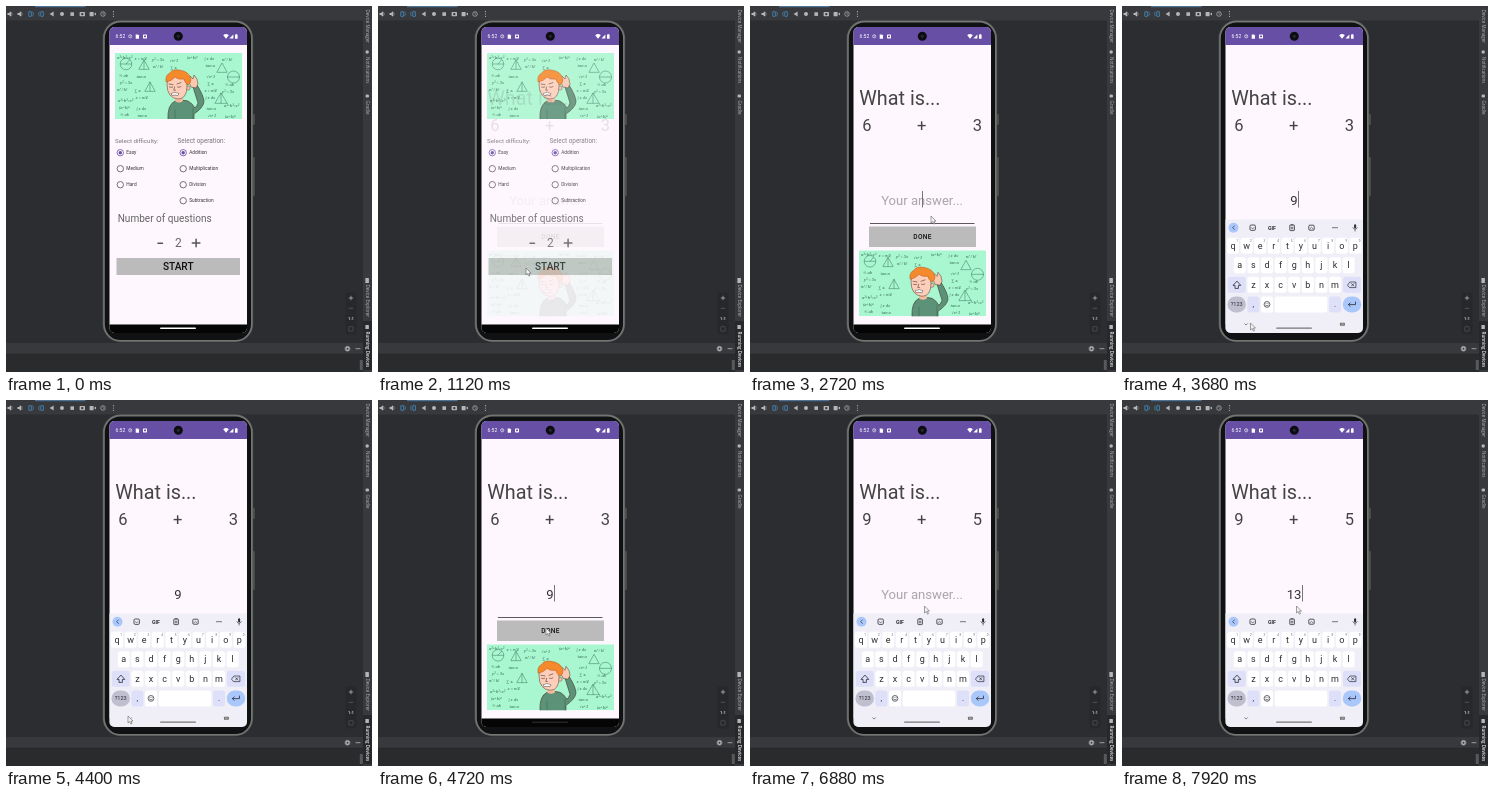
An HTML page that plays this animation: 366x366 px, repeating every 8000 ms.

```html
<!DOCTYPE html>
<html lang="en">
<head>
<meta charset="utf-8">
<title>Maths quiz in an emulator</title>
<style>
html, body { margin: 0; width: 100%; height: 100%; overflow: hidden; background: #2c2d31; }
svg { display: block; width: 100vw; height: 100vh; }
text { font-family: Roboto, Arial, sans-serif; white-space: pre; }
.side { font-family: "Open Sans", sans-serif; font-size: 4.5px; fill: #b4b6b8; }
.math { font: italic 3.9px "Noto Serif", "Liberation Serif", serif; fill: #2e6650; }
.line { fill: none; stroke-linecap: round; stroke-linejoin: round; }
</style>
</head>
<body>
<svg viewBox="0 0 366 366">
  <defs>
    <clipPath id="screen"><rect x="103.5" y="21" width="137.5" height="306" rx="5"/></clipPath>
    <clipPath id="card"><rect width="127" height="66"/></clipPath>
    <g id="picture" clip-path="url(#card)"></g>
  </defs>
  <g id="ide"></g>
  <g id="phone"></g>
  <g clip-path="url(#screen)">
    <rect x="103" y="20" width="139" height="308" fill="#fef7fd"/>
    <g id="home"></g>
    <g id="quiz"></g>
    <g id="toast"></g>
    <rect x="103" y="318.5" width="139" height="9" fill="#050506"/>
    <rect id="handle" x="154" y="321.4" width="36" height="1.6" rx=".8"/>
    <g id="keys"></g>
    <g id="status"></g>
  </g>
  <path id="pointer" d="M0 0V7L1.7 5.5 2.9 8.1 4 7.6 2.9 5.1H5Z" fill="#f4f4f4" stroke="#555" stroke-width=".55"/>
</svg>
<script>
const $ = id => document.getElementById(id);
const put = (id, ...parts) => $(id).innerHTML = parts.flat().join('');
const text = (x, y, size, s, fill = '#444', extra = '') =>
  `<text x="${x}" y="${y}" font-size="${size}" fill="${fill}" ${extra}>${s}</text>`;
const mid = (x, y, size, s, fill, extra = '') => text(x, y, size, s, fill, 'text-anchor="middle" ' + extra);
const box = (x, y, w, h, fill, r = 0, extra = '') =>
  `<rect x="${x}" y="${y}" width="${w}" height="${h}" rx="${r}" fill="${fill}" ${extra}/>`;
const dot = (x, y, r, fill, extra = '') => `<circle cx="${x}" cy="${y}" r="${r}" fill="${fill}" ${extra}/>`;
const ring = (x, y, r, color, w = .7) => dot(x, y, r, 'none', `stroke="${color}" stroke-width="${w}"`);
const line = (d, color, w = .7) => `<path class="line" d="${d}" stroke="${color}" stroke-width="${w}"/>`;
const shape = (d, fill, extra = '') => `<path d="${d}" fill="${fill}" ${extra}/>`;

// Development environment
const icon = '#b4b6b8', blue = '#4a9bd0', bar = '#37393d', panel = '#26282b';
const speaker = x => shape(`M${x - 2.5} 7h1.5l2-1.8v5.6l-2-1.8h-1.5z`, icon) + line(`M${x + 1.7} 6.4q1.2 1.6 0 3.2`, icon, .6);
const handset = (x, side) => box(x - 1.2 - side, 5.6, 2.6, 4.8, 'none', .4, `stroke="${blue}" stroke-width=".7"`) +
  line(`M${x + 1.8 * side} 6q${1.6 * side} 2 0 4`, blue, .6);
const sideTab = (y, s, extra = '') => `<text class="side" transform="translate(359.6 ${y}) rotate(90)" ${extra}>${s}</text>`;
put('ide',
  box(0, 0, 366, 366, '#2c2d31'),
  box(0, 0, 366, 14.5, bar), box(29, 0, 50.5, 1.2, '#4f7396'),
  speaker(4), speaker(14), handset(25, 1), handset(35, -1),
  shape('M43.6 8l4-2.4v4.8z', icon), dot(56, 8, 2, icon), box(64.4, 6.3, 3.6, 3.6, icon),
  box(73.6, 6, 5.4, 4.3, icon, .7), dot(76.3, 8.1, 1.2, bar),
  box(83.6, 6, 4, 4.2, icon, .5), shape('M88 8l2-1.6v3.2z', icon),
  ring(97, 8, 2.3, icon), line('M97 6.6V8l1 .7', icon, .5),
  [5.7, 8, 10.3].map(y => dot(107.5, y, .6, icon)),
  box(357, 0, 9, 366, bar), box(357, 315, 9, 49, panel),
  sideTab(3.5, 'Device Manager'), sideTab(51, 'Notifications'), sideTab(94.5, 'Gradle'),
  sideTab(278.5, 'Device Explorer'), sideTab(325.5, 'Running Devices', 'style="fill:#e4e4e4" font-weight="600"'),
  dot(361.2, 46, 1.7, icon), box(359.6, 88.5, 3.4, 3, icon, 1.2),
  box(359.4, 272, 3.5, 5, icon, .5), box(359.4, 319, 3.5, 4, icon, .5),
  box(339.5, 286.5, 11, 21, panel, 2), box(339.5, 307.5, 11, 21, panel, 2),
  line('M343.2 292h3.6M345 290.2v3.6', '#c2c4c6'), line('M343.2 302.3h3.6', '#666'),
  mid(345, 314.3, 4.2, '1:1', '#c2c4c6', 'font-weight="700"'),
  box(342.8, 320.7, 4.4, 4.4, 'none', .4, 'stroke="#5c5e60" stroke-width=".6"'),
  box(0, 337, 357, 11.3, bar), box(0, 348.3, 357, 18, '#2a2b2d'), box(0, 347.8, 357, .6, '#242527'),
  ring(341.5, 342.7, 1.6, icon, 1.2), ring(341.5, 342.7, 2.5, icon, .5),
  line('M350 342.7h4', icon, .8), box(353.8, 354, 3, 10, '#58595b')
);

// Device frame and status bar
put('phone',
  box(246, 108, 2.8, 11, '#505250', 1), box(246, 151, 2.8, 39, '#505250', 1),
  box(96.6, 14.2, 150.6, 322, '#4c4e4d', 18),
  box(98, 15.6, 147.8, 319.2, '#101112', 16.5, 'stroke="#737573" stroke-width="1.6"')
);
put('status',
  box(103, 20, 139, 19, '#674fa5'),
  text(109.6, 32.3, 5, '6:52', '#fff'),
  ring(124.2, 30.3, 1.6, '#fff', .6), line('M124.2 29.4v1l.6.3', '#fff', .4),
  shape('M129.7 28.4h2.3l1 1v3.3h-3.3z', '#fff'), box(137, 28.4, 4, 4, '#fff', .6), box(138, 29.6, 2, 1.6, '#674fa5'),
  shape('M217.2 29.2q2.8-2.2 5.6 0L220 32.7z', '#fff'), shape('M223.4 32.6l4-4.2v4.2z', '#fff'),
  box(229, 28.6, 2.6, 4.2, '#fff', .5), box(229.7, 28, 1.2, .8, '#fff'),
  dot(172.3, 30.2, 4.5, '#0c0d10'), dot(172.3, 30.2, 1.5, '#262833')
);

// Illustration: a puzzled pupil in front of formulas
const formulas = ['a²+b²=c²', '∑ xᵢ', '(a+b)ⁿ', 'x = π/4', '½ ab', '∫ x dx', 'y² = 3x', 'tan α', 'n! / k!', '√x+1'];
const drawn = [[11, 11], [118, 24], [29, 12], [107, 15], [35, 34], [106, 45]];
const scribbles = [];
for (let i = 0; i < 56; i++) {
  const row = Math.floor(i / 7), x = 2 + i % 7 * 17.5 + row * 5 % 4, y = 5.5 + row * 8 + i * 5 % 4;
  const behind = x > 36 && x < 88 && y > 16;
  const crowded = drawn.some(([u, v]) => Math.abs(x + 6 - u) < 9 && Math.abs(y - 1.5 - v) < 6);
  if (!behind && !crowded) scribbles.push(`<text class="math" x="${x}" y="${y}">${formulas[(i * 3 + row) % 10]}</text>`);
}
const ink = '#34735a', outline = '#4b3329';
const edge = w => `stroke="${outline}" stroke-width="${w}" stroke-linejoin="round"`;
put('picture',
  box(0, 0, 127, 66, '#a9f7d0'), scribbles,
  ring(11, 11, 5.8, ink, .5), line('M5.5 11h11M11 11l3.5-4', ink, .5),
  ring(118.5, 24, 6, ink, .5), line('M112.5 24h12', ink, .5),
  ['M24 16l5-9 5 9zM29 7v9', 'M102 19l5-9 5 9z', 'M30 38l5-9 5 9zM35 29v9', 'M100 50l6-10 6 10zM106 40v10'].map(d => line(d, ink, .5)),
  shape('M53 67q-1-15 7-19 6-2 13 0 4 2 7 7 2-2 3-5l-5-16 4-2q7 11 7 17-1 6-10 12v6z', '#5c9278', edge(.6)),
  line('M60 57v9M78 55v11', '#3f6f59', .6),
  shape('M60 43h8v5q-4 3-8 0z', '#f5b9a0'),
  shape('M76 34l-3-7 2-4 3 3 1-4 3 4 1 5-2 4z', '#fbc9b2', edge(.5)),
  dot(73, 35, 2.1, '#f9c0a8', edge(.4)),
  shape('M52 31q0-8 10-8 10 1 10 10 0 13-9 13-11-1-11-15z', '#fdcfba', edge(.5)),
  shape('M51 29q-1-7 4-9 2-4 9-3 10 1 12 9 0 4-3 6l-3-3-1-3q-6 1-9-2-3 4-9 5z', '#f58a2c', 'stroke="#b4571c" stroke-width=".5"'),
  line('M54 31l4 .6M62 31l4-1.4M54.5 34q1.7 1 3.2 0M62.5 34q1.7 1 3.4-.4M59.6 34l-.8 3.2h1.6', outline, .6),
  shape('M56 40.5q4-2.5 8 0l-1 2q-3-1-6 0z', '#fff', edge(.5))
);
const picture = y => `<use href="#picture" x="109" y="${y}"/>`;

// Start screen
const radio = (x, y, label, on) =>
  ring(x, y, 3.2, on ? '#674fa5' : '#55515a', .8) + (on ? dot(x, y, 1.7, '#674fa5') : '') + text(x + 6, y + 1.7, 4.8, label, '#333');
put('home',
  picture(47),
  text(109, 137, 6.2, 'Select difficulty:', '#777'), text(171.5, 137, 6.4, 'Select operation:', '#777'),
  ['Easy', 'Medium', 'Hard'].map((s, i) => radio(114.3, 146.7 + i * 16, s, !i)),
  ['Addition', 'Multiplication', 'Division', 'Subtraction'].map((s, i) => radio(177.2, 146.7 + i * 16, s, !i)),
  text(111.7, 216, 10.05, 'Number of questions', '#666'),
  mid(172.3, 241, 12, '2', '#666'),
  line('M152 237.3h4.5M186.3 237h7.6M190.1 233.2v7.6', '#555', 1.5),
  box(110.5, 252, 123.5, 17, '#bbb'), mid(172.3, 264, 10.1, 'START', '#111', 'font-weight="500"')
);

// Question screen
put('quiz',
  text(109.3, 99, 19.8, 'What is...'),
  mid(117, 125.2, 16.5, '6', '#444', 'id="left"'), mid(171.8, 125.2, 16.5, '+'), mid(227.3, 125.2, 16.5, '3', '#444', 'id="right"'),
  mid(172, 198.5, 13.1, '', '#444', 'id="answer"'),
  box(0, 185, .8, 16.5, '#555', 0, 'id="caret"'),
  box(120, 217, 104.5, .9, '#4a474c'),
  box(119, 220.5, 107, 20.5, '#bbb'),
  mid(172.5, 233.2, 6.6, 'DONE', '#111', 'font-weight="500" letter-spacing=".25"'),
  picture(244.3)
);
put('toast',
  box(140, 288.2, 64, 14, '#faf7fb', 7, 'stroke="#ddd" stroke-width=".3"'),
  dot(150, 295.2, 4, '#3fae7d'), text(157, 296.9, 4.8, 'Correct. Good work', '#333')
);

// Soft keyboard
const lilac = '#dde0f8', dark = '#2b2c35';
const key = (x, y, w, fill = '#fff', r = 2.5) => box(x - w / 2, y, w, 16, fill, r);
const letters = (row, x0, y) => [...row].map((c, i) => key(x0 + i * 13.6, y, 12) + mid(x0 + i * 13.6, y + 10.9, 9, c, dark));
put('keys',
  box(103, 213.5, 139, 114, '#f0eff7'),
  dot(111.5, 221.7, 5, '#aac7fb'), line('M112.3 220l-1.6 1.7 1.6 1.7', dark),
  box(128, 219, 5.4, 5.4, 'none', 1.2, `stroke="${dark}" stroke-width=".8"`), line('M129.4 222q1.3 1.4 2.6 0', dark, .6),
  mid(150, 223.6, 5.2, 'GIF', dark, 'font-weight="700"'),
  box(167.8, 219, 4.6, 5.6, 'none', .6, `stroke="${dark}" stroke-width=".8"`), line('M169.2 218.8h1.8M169.2 221.3h1.8M169.2 222.8h1.8', dark, .7),
  box(186.8, 219.2, 5.4, 5, 'none', .9, `stroke="${dark}" stroke-width=".8"`), line('M188 222.8l1.5-1.4 1.5 1.4', dark, .6),
  [211, 213, 215].map(x => dot(x, 221.7, .65, dark)),
  box(232.1, 218.3, 2, 4.2, dark, 1), line('M230.9 221.6q2.2 4 4.4 0M233.1 223.7v1.4', dark, .6),
  letters('qwertyuiop', 111, 231.8), [...'1234567890'].map((c, i) => mid(115.2 + i * 13.6, 235.8, 3, c, '#666')),
  letters('asdfghjkl', 117.8, 251.2), letters('zxcvbnm', 131.4, 270.8),
  key(114.7, 270.8, 18, lilac), line('M114.7 275.4l-3.7 4h2v3h3.4v-3h2z', dark, .8),
  key(230, 270.8, 18, lilac), line('M225.7 278.8l2.2-2.8h6v5.6h-6zM229.5 277.6l2.4 2.4M231.9 277.6l-2.4 2.4', dark, .7),
  key(114.7, 290.4, 18.5, '#c0bfd0', 8), mid(114.7, 300.3, 5.6, '?123', dark),
  key(131.4, 290.4, 12, lilac), mid(131.4, 300.6, 8, ',', dark),
  key(145, 290.4, 12), ring(145, 298.4, 2.9, dark), line('M143.5 299.2q1.5 1.6 3 0M144 297.3v.2M146 297.3v.2', dark, .6),
  key(179, 290.4, 52.5), key(213, 290.4, 12, lilac), mid(213, 300.6, 8, '.', dark),
  key(230, 290.4, 18.5, '#a9c7fb', 8), line('M233.5 296v2.6h-7M228.2 296.9l-1.8 1.7 1.8 1.7', dark, .8),
  line('M122.7 317.7l1.4 1.4 1.4-1.4', '#555'),
  box(154, 321.4, 36, 1.3, '#777', .6),
  box(218, 316.8, 4.8, 3, '#666', .5), line('M219 317.8h2.8M219.4 318.8h2', '#f0eff7', .4)
);

// Motion
const LOOP = 8000;
const ramp = (t, a, b) => Math.min(1, Math.max(0, (t - a) / (b - a)));
const ease = p => p * p * (3 - 2 * p);
const path = [ // time, x, y
  [880, 148, 262], [1440, 148, 262], [1680, 151, 224], [2000, 170, 188], [2320, 173, 190], [2480, 181, 210],
  [3440, 181, 210], [3680, 128.5, 317], [4160, 122, 316], [4440, 122, 316], [4720, 168, 228],
  [5600, 168, 228], [5960, 174.5, 206], [LOOP, 174.5, 206]
];
const blinks = [1840, 2720, 3440, 5280, 7440, 7760];

function pointerAt(t) {
  const i = Math.max(1, path.findIndex(p => p[0] > t));
  const [a, b] = [path[i - 1], path[i]], p = ease(ramp(t, a[0], b[0]));
  return [a[1] + (b[1] - a[1]) * p, a[2] + (b[2] - a[2]) * p];
}

function draw(t) {
  const swap = ramp(t, 1100, 1270);
  $('home').style.opacity = 1 - swap;
  $('quiz').style.opacity = swap;

  const next = t >= 5440;
  $('left').textContent = next ? 9 : 6;
  $('right').textContent = next ? 5 : 3;
  const typed = next ? (t < 7440 ? '' : t < 7760 ? '1' : '13') : t < 3440 ? '' : '9';
  $('answer').textContent = typed || 'Your answer...';
  $('answer').setAttribute('fill', typed ? '#333' : '#aaa5ab');

  const start = blinks.filter(b => b <= t).pop();
  $('caret').style.display = (t - start) % 1000 < 500 ? '' : 'none';
  $('caret').setAttribute('x', 172 + typed.length * 4.1);

  const up = t < 4400 ? ease(ramp(t, 2800, 3040)) : t < 6000 ? 1 - ease(ramp(t, 4400, 4640)) : ease(ramp(t, 6640, 6880));
  $('keys').style.display = up ? '' : 'none';
  $('keys').setAttribute('transform', `translate(0 ${114 * (1 - up)})`);
  $('handle').setAttribute('fill', t > 4400 && t < 4880 ? '#242426' : '#fff');
  $('toast').style.opacity = ramp(t, 5520, 5680) * (1 - ramp(t, 7000, 7200));

  $('pointer').style.display = t < 880 ? 'none' : '';
  $('pointer').setAttribute('transform', `translate(${pointerAt(t)})`);
}

const origin = performance.now();
function tick() {
  draw((performance.now() - origin) % LOOP);
  requestAnimationFrame(tick);
}
tick();
</script>
</body>
</html>
```
